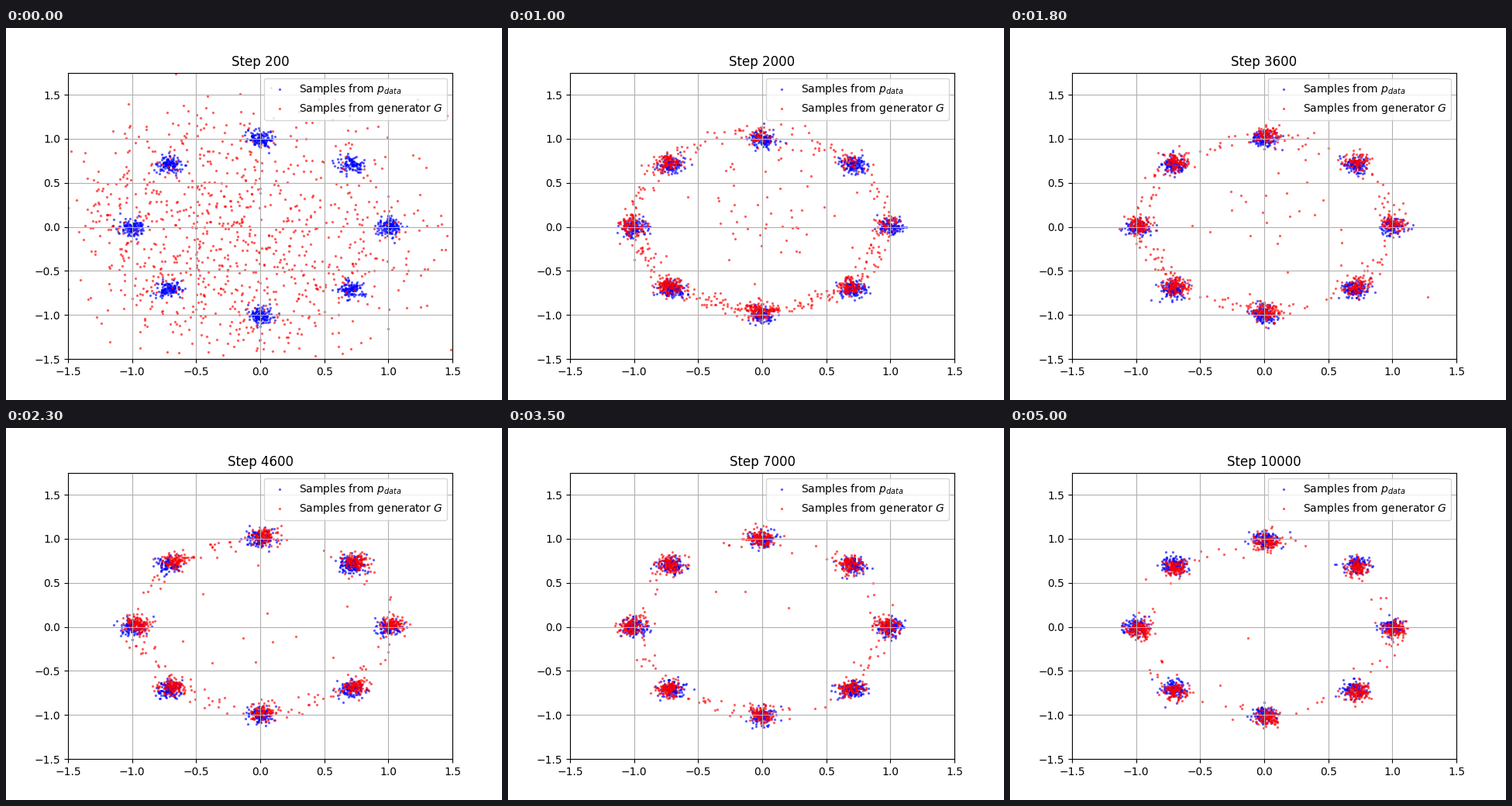
Recreate the animation shown at these times as a matplotlib script. Size 640 by 480 pixels, loop 5100 ms.

```python
import numpy as np
import matplotlib.pyplot as plt
from matplotlib.animation import FuncAnimation

N_SAMPLES = 1000
SPREAD = 0.05
FRAMES, INTERVAL = 51, 100
RING_STEP = 1200  # the generator's cloud has become a ring by this step
SECTOR = np.pi / 4


def unit(angle):
    return np.column_stack([np.cos(angle), np.sin(angle)])


def pick_sectors(rng, offset, bias):
    """Choose among eight directions, favouring the lower left."""
    angles = (np.arange(8) + offset) * SECTOR
    weights = 1 + bias * np.cos(angles - np.radians(230))
    return rng.choice(8, N_SAMPLES, p=weights / weights.sum()) * SECTOR


def real_samples(rng):
    points = unit(rng.integers(8, size=N_SAMPLES) * SECTOR)
    return points + rng.normal(0, SPREAD, points.shape)


def drift(step):
    """Slow wander of the generated clusters around the true ones."""
    return np.array([0.03 * np.cos(2 * np.pi * (step - 4600) / 6500),
                     0.04 * np.cos(np.pi * (step - 2800) / 10000)])


def ring_samples(rng, step):
    """Clusters, the strands between them, and a few strays inside."""
    early = np.exp(-abs(step - RING_STEP) / 1600)
    strand_share = 0.08 + 0.4 * np.exp(-max(step - RING_STEP, 0) / 2500)
    stray_share = 0.003 + 0.13 * early ** 1.3

    points = unit(pick_sectors(rng, 0, 0.95 * early))

    start = pick_sectors(rng, 0.5, 0.95 * early)
    along = rng.beta(0.8, 0.8, (N_SAMPLES, 1))
    strands = unit(start) * (1 - along) + unit(start + SECTOR) * along
    top = np.maximum(np.sin(start + SECTOR / 2), 0)[:, None]
    strands *= 1 + 4 * (0.04 + 0.2 * early ** 2 * top) * along * (1 - along)

    in_strand = rng.random(N_SAMPLES) < strand_share
    points[in_strand] = strands[in_strand]
    points += rng.normal(0, SPREAD, points.shape)

    stray = rng.random(N_SAMPLES) < stray_share
    strays = rng.normal([0.3 * early, 0.1 + 0.3 * early], 0.42, points.shape)
    points[stray] = strays[stray]
    return points + drift(step)


def generated_samples(rng, step):
    ring = ring_samples(rng, step)
    radius = 1.3 * np.sqrt(rng.random((N_SAMPLES, 1)))
    cloud = ring * radius + rng.normal(0, 0.3, ring.shape)
    remaining = max(RING_STEP - step, 0) / 1000
    return ring + (cloud - ring) * remaining ** 2


plt.rcParams["text.kerning_factor"] = 6
fig, ax = plt.subplots(figsize=(6.4, 4.8), dpi=100)
style = dict(s=2, alpha=0.5)
real = ax.scatter([], [], color="blue", label=r"Samples from $p_{data}$", **style)
fake = ax.scatter([], [], color="red", label=r"Samples from generator $G$", **style)
ax.set_xlim(-1.5, 1.5)
ax.set_ylim(-1.5, 1.75)
ax.grid(True)
ax.legend(loc="upper right")
title = ax.set_title("Step 200")


def update(frame):
    step = 200 * max(frame, 1)
    rng = np.random.default_rng(step)
    real.set_offsets(real_samples(rng))
    fake.set_offsets(generated_samples(rng, step))
    title.set_text(f"Step {step}")
    return real, fake, title


anim = FuncAnimation(fig, update, frames=FRAMES, interval=INTERVAL,
                     repeat=True, repeat_delay=0)
plt.show()
```
